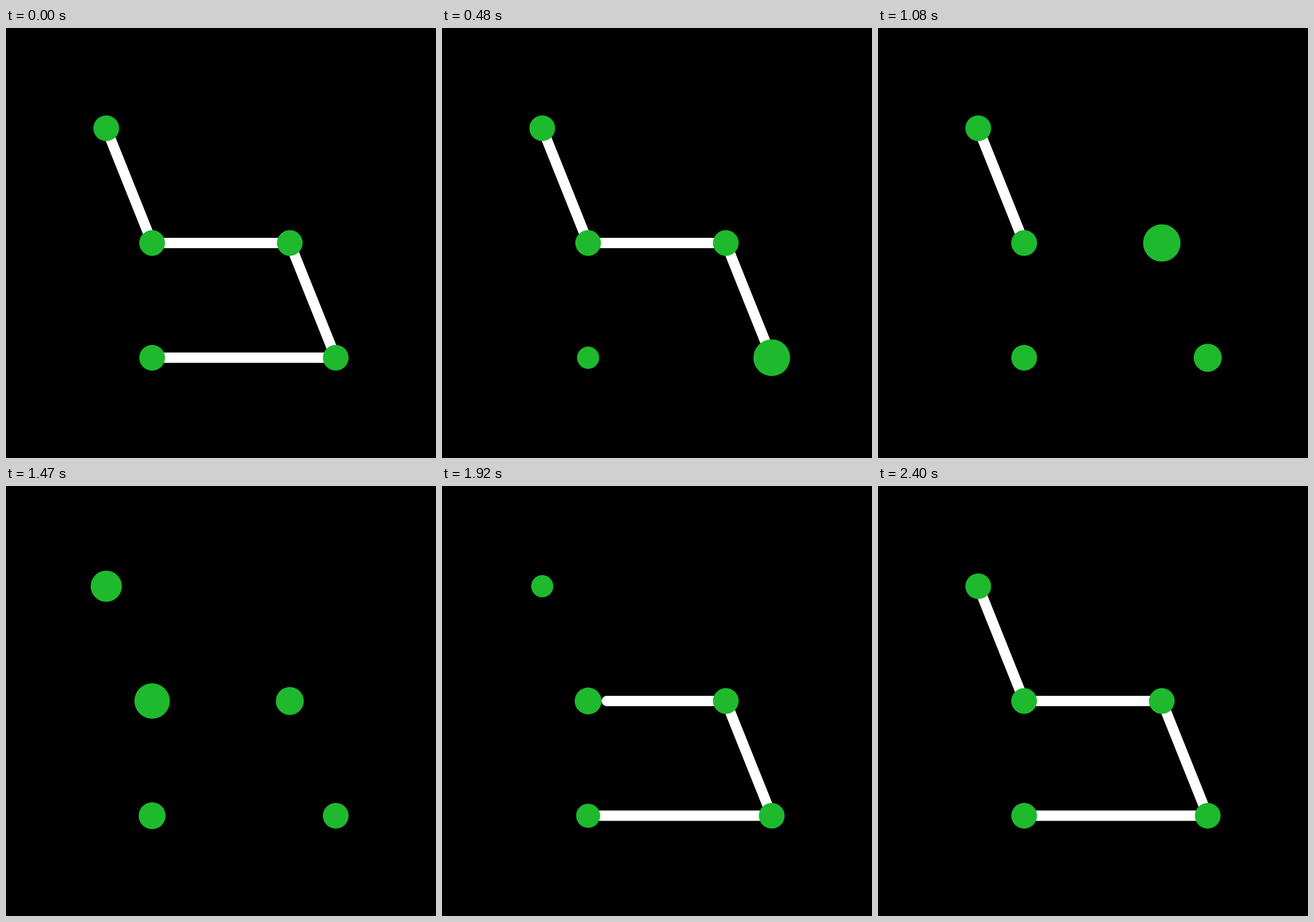
Recreate the animation shown at these times as an HTML page. Size 748 by 748 pixels, loop 2.43 s.

```html
<!DOCTYPE html>
<html lang="en">
<head>
<meta charset="utf-8">
<title>Dot path</title>
<style>
  html, body { margin: 0; width: 100%; height: 100%; overflow: hidden; background: #000; }
  svg { display: block; width: 100vw; height: 100vh; }
  path { fill: none; stroke: #fff; stroke-width: 18; stroke-linecap: round; stroke-linejoin: round; }
  circle { fill: #1eb92d; }
</style>
</head>
<body>
<svg viewBox="0 0 748 748"><path id="line"/></svg>
<script>
  const STEP = 30, STEPS = 81, REST = 22.4;

  // Each dot: position and the steps at which its pulse peaks.
  const dots = [
    { x: 254.2, y: 573.6, peaks: [9, 58] },
    { x: 573.6, y: 573.6, peaks: [21] },
    { x: 493.7, y: 374, peaks: [33.5] },
    { x: 254.2, y: 374, peaks: [46] },
    { x: 174.4, y: 174.4, peaks: [56] }
  ];

  // Pulse shape: step relative to the peak, radius.
  const pulse = [[-10.5, REST], [-1.2, 37.4], [0, 37.4], [7.4, 19.2], [15, 24.4], [21, REST]];

  const svg = document.querySelector('svg');
  const line = document.getElementById('line');
  line.setAttribute('d', 'M' + dots.map(d => d.x + ' ' + d.y).join('L'));
  const len = line.getTotalLength();
  line.style.strokeDasharray = `${len} ${2 * len}`;

  for (const d of dots) {
    d.el = document.createElementNS(svg.namespaceURI, 'circle');
    d.el.setAttribute('cx', d.x);
    d.el.setAttribute('cy', d.y);
    svg.append(d.el);
  }

  const clamp = u => Math.min(1, Math.max(0, u));
  const smooth = u => u * u * (3 - 2 * u);

  function radius(step, peak) {
    const at = step - peak;
    for (let i = 1; i < pulse.length; i++) {
      const [t1, r1] = pulse[i];
      if (at >= t1) continue;
      const [t, r0] = pulse[i - 1];
      const t0 = Math.max(t, -peak); // no pulse starts before the loop does
      return r0 + (r1 - r0) * smooth(clamp((at - t0) / (t1 - t0)));
    }
    return REST;
  }

  // Erase from the first dot, then draw again in the same direction.
  const dashOffset = step => step < 49
    ? -len * clamp(step / 45)
    : len * (1 - clamp((step - 49) / 20));

  function render(step) {
    line.style.strokeDashoffset = dashOffset(step);
    for (const d of dots) {
      const peak = d.peaks.findLast(p => step >= p - 10.5) ?? d.peaks[0];
      d.el.setAttribute('r', radius(step, peak).toFixed(2));
    }
  }

  const start = performance.now();
  function tick() {
    render(Math.floor((performance.now() - start) / STEP) % STEPS);
    requestAnimationFrame(tick);
  }
  tick();
</script>
</body>
</html>
```
